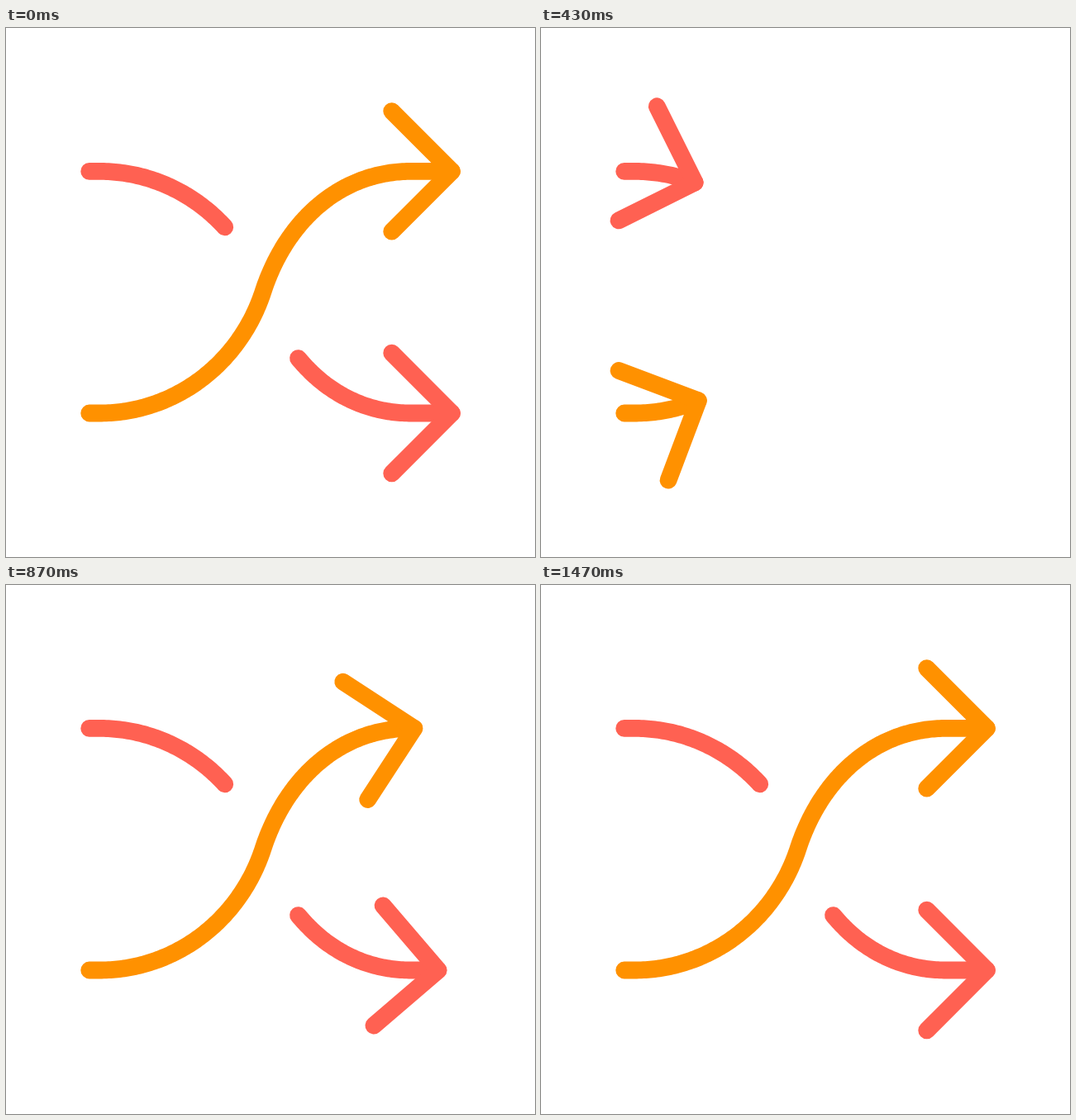
These frames come from a looping animation (640 px wide and 640 px high, 2 s). An HTML page with a canvas:

```html
<!DOCTYPE html>
<html lang="en">
<head>
<meta charset="utf-8">
<title>Shuffle</title>
<style>
  html, body { margin: 0; width: 100%; height: 100%; overflow: hidden; background: #fff; }
  canvas { display: block; width: 100vw; height: 100vh; }
</style>
</head>
<body>
<canvas width="640" height="640"></canvas>
<script>
const ctx = document.querySelector('canvas').getContext('2d');
const LOOP = 2000, STEP = 1000 / 30;
const BARB = 72.8;
const RETRACTED = 58;

// Cubic easing with control points (x1, 0) and (x2, 1).
const ease = (x1, x2) => u => {
  if (u <= 0) return 0;
  if (u >= 1) return 1;
  let lo = 0, hi = 1;
  for (let i = 0; i < 30; i++) {
    const t = (lo + hi) / 2, r = 1 - t;
    if (3 * x1 * t * r * r + 3 * x2 * t * t * r + t ** 3 < u) lo = t; else hi = t;
  }
  return lo * lo * (3 - 2 * lo);
};
const smooth = ease(1 / 3, 2 / 3);
const settle = ease(0.333, 0.17);
const settleLate = ease(0.36, 0.23);
const settleFast = u => smooth(u * 2.6);
const mix = (a, b, k) => a + (b - a) * k;

// Rising curve sampled as points with their distance from the start.
function buildPath(mirror) {
  const points = [];
  const add = (x, y) => {
    if (mirror) y = 639.4 - y;
    const last = points[points.length - 1];
    points.push({ x, y, s: last ? last.s + Math.hypot(x - last.x, y - last.y) : 0 });
  };
  const curve = (ax, ay, bx, by, cx, cy, dx, dy) => {
    for (let i = 0; i <= 100; i++) {
      const t = i / 100, r = 1 - t;
      const blend = (a, b, c, d) => a * r ** 3 + 3 * b * r * r * t + 3 * c * r * t * t + d * t ** 3;
      add(blend(ax, bx, cx, dx), blend(ay, by, cy, dy));
    }
  };
  add(100.7, 466);
  curve(113, 466, 205, 466, 283, 405, 311, 319);
  curve(311, 319, 339, 233, 405, 173.4, 490, 173.4);
  add(539.5, 173.4);
  return points;
}

function pointAt(path, s) {
  if (s <= 0) return path[0];
  for (let i = 1; i < path.length; i++) {
    const a = path[i - 1], b = path[i];
    if (b.s >= s && b.s > a.s) {
      const k = (s - a.s) / (b.s - a.s);
      return { x: mix(a.x, b.x, k), y: mix(a.y, b.y, k), s };
    }
  }
  return path[path.length - 1];
}

function headingAt(path, s) {
  const a = pointAt(path, s - 30), b = pointAt(path, s + 30);
  return Math.atan2(b.y - a.y, b.x - a.x);
}

const makeArrow = (color, mirror, options) => {
  const path = buildPath(mirror);
  return { color, path, length: path[path.length - 1].s, ...options };
};
const red = makeArrow('#ff6152', true, {
  pullBack: ease(0.37, 0.696), twist: [0.88, 1.02], bounce: 52, tilt: 0.242,
  headSettle: settle, tiltSettle: settleFast
});
const orange = makeArrow('#ff9100', false, {
  pullBack: ease(0.37, 0.728), twist: [1.09, 0.78], bounce: 144, tilt: -0.655,
  headSettle: settleLate, tiltSettle: settleLate
});
const distanceAtX = (path, x) => path.find(p => p.x >= x).s;
red.gap = [distanceAtX(red.path, 264.4), distanceAtX(red.path, 353.3)];

function pose(arrow, frame) {
  const { path, length, pullBack, twist, bounce, tilt } = arrow;
  if (frame < 23) {
    const back = frame < 15;
    const s = back
      ? mix(length, RETRACTED, pullBack(frame / 15))
      : mix(RETRACTED, length, smooth((frame - 15) / 8));
    return { line: s, head: s, angle: headingAt(path, s) * twist[back ? 0 : 1] };
  }
  const u = (frame - 31) / 13;
  const amount = settling => frame < 31 ? smooth((frame - 23) / 8) : 1 - settling(u);
  return {
    line: length - bounce * amount(settle),
    head: length - bounce * amount(arrow.headSettle),
    angle: tilt * amount(arrow.tiltSettle)
  };
}

function strokePart(path, from, to) {
  if (to <= from) return;
  const a = pointAt(path, from), b = pointAt(path, to);
  ctx.beginPath();
  ctx.moveTo(a.x, a.y);
  for (const p of path) if (p.s > from && p.s < to) ctx.lineTo(p.x, p.y);
  ctx.lineTo(b.x, b.y);
  ctx.stroke();
}

function drawArrow(arrow, frame) {
  const { path, gap, color } = arrow;
  const { line, head, angle } = pose(arrow, frame);
  ctx.strokeStyle = color;
  if (gap) {
    strokePart(path, 0, Math.min(line, gap[0]));
    strokePart(path, gap[1], line);
  } else {
    strokePart(path, 0, line);
  }
  const tip = pointAt(path, head);
  ctx.save();
  ctx.translate(tip.x, tip.y);
  ctx.rotate(angle);
  ctx.beginPath();
  ctx.moveTo(-BARB, -BARB);
  ctx.lineTo(0, 0);
  ctx.lineTo(-BARB, BARB);
  ctx.stroke();
  ctx.restore();
}

function render() {
  const time = performance.now() % LOOP;
  const frame = Math.floor((time + 3.4) / STEP);
  ctx.fillStyle = '#fff';
  ctx.fillRect(0, 0, 640, 640);
  ctx.lineWidth = 20.8;
  ctx.lineCap = ctx.lineJoin = 'round';
  drawArrow(red, frame % 60);
  drawArrow(orange, frame % 60);
  requestAnimationFrame(render);
}
render();
</script>
</body>
</html>
```
